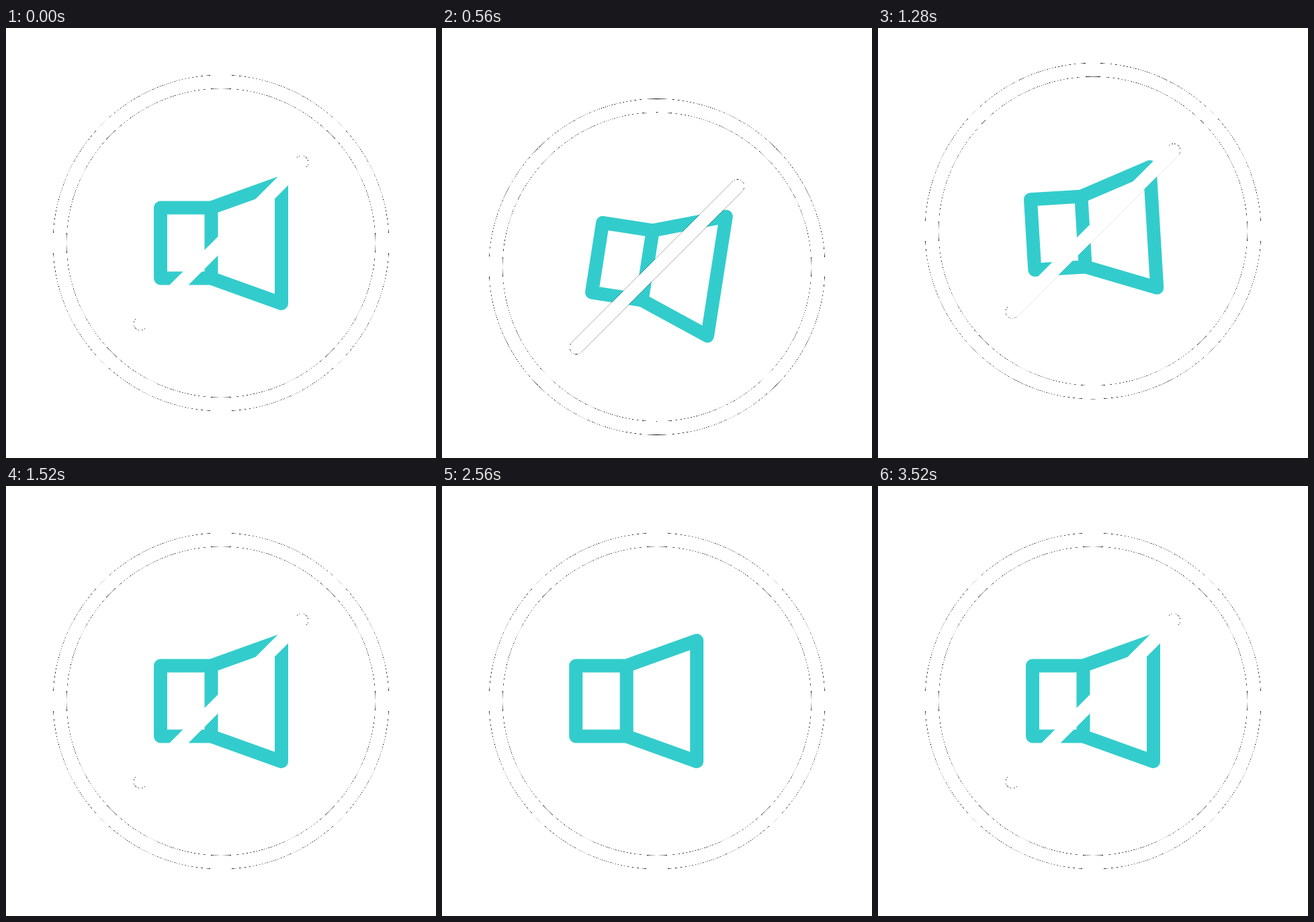
An HTML page with a canvas that plays this animation: 640x640 px, repeating every 3760 ms.

```html
<!DOCTYPE html>
<html lang="en">
<head>
<meta charset="utf-8">
<title>Mute toggle</title>
<style>
  html, body { margin: 0; width: 100%; height: 100%; overflow: hidden; background: #fff; }
  canvas { display: block; width: 640px; height: 640px; }
</style>
</head>
<body>
<canvas id="stage" width="640" height="640"></canvas>
<script>
const SIZE = 640, LOOP = 3760, STEP = 80, LAST = 3520;
const FRINGE_MAX = 130;

const ctx = document.getElementById('stage').getContext('2d');
const layer = document.createElement('canvas');
layer.width = layer.height = SIZE;
const ink = layer.getContext('2d', { willReadFrequently: true });

for (const c of [ctx, ink]) {
  c.lineWidth = 20;
  c.lineCap = c.lineJoin = 'round';
}
ctx.strokeStyle = '#3cc';
ink.strokeStyle = '#fff';

const ease = p => p * p * (3 - 2 * p);
const ramp = (t, from, to) => ease(Math.min(1, Math.max(0, (t - from) / (to - from))));

// Eased value through [time, value] keys.
function track(t, keys) {
  let value = keys[0][1];
  for (let i = 1; i < keys.length; i++) {
    const [t0, v0] = keys[i - 1], [t1, v1] = keys[i];
    value += (v1 - v0) * ramp(t, t0, t1);
  }
  return value;
}

// Part of a line between the fractions a and b.
function trimmed(x0, y0, x1, y1, a, b) {
  if (a >= b) return;
  const dx = x1 - x0, dy = y1 - y0;
  ink.beginPath();
  ink.moveTo(x0 + dx * a, y0 + dy * a);
  ink.lineTo(x0 + dx * b, y0 + dy * b);
  ink.stroke();
}

const speaker = new Path2D(
  'M230 267.5H305.5L410 230V410L305.5 372.5H230ZM305.5 267.5V372.5');

// Edge pixels less than half covered turn dark, the others stay white.
function darkenFringe() {
  const image = ink.getImageData(0, 0, SIZE, SIZE), px = image.data;
  for (let i = 0; i < px.length; i += 4) {
    const alpha = px[i + 3];
    if (alpha && alpha < FRINGE_MAX) {
      px[i] = px[i + 1] = px[i + 2] = 0;
      px[i + 3] = 2 * alpha;
    }
  }
  ink.putImageData(image, 0, 0);
}

function draw(t) {
  const y = track(t, [[0, 0], [480, 39.7], [1040, -35.7], [1520, 0]]);
  const tilt = track(t, [[0, 0], [480, 9.8], [1040, -6.9], [1520, 0]]);
  const x = track(t, [[1520, 0], [2000, -47.5], [2240, -47.5], [3040, 0]]);

  ctx.fillStyle = '#fff';
  ctx.fillRect(0, 0, SIZE, SIZE);
  ctx.save();
  ctx.translate(320 + x, 320 + y);
  ctx.rotate(tilt * Math.PI / 180);
  ctx.translate(-320, -320);
  ctx.stroke(speaker);
  ctx.restore();

  ink.clearRect(0, 0, SIZE, SIZE);
  ink.save();
  ink.translate(0, y);
  ink.beginPath();
  ink.arc(320, 320, 240, 0, 2 * Math.PI);
  ink.stroke();

  const redraw = t > 2600;
  trimmed(200, 440, 440, 200,
    redraw ? 0 : ramp(t, 1760, 2400),
    redraw ? ramp(t, 2740, 3480) : 1);

  const tail = ramp(t, 2240, 2560), head = ramp(t, 1760, 2240);
  trimmed(408, 320, 446, 320, tail, head);
  trimmed(411, 292, 437, 270, tail, head);
  trimmed(411, 348, 437, 370, tail, head);
  ink.restore();

  darkenFringe();
  ctx.drawImage(layer, 0, 0);
}

const start = performance.now();
let shown = -1;
function tick() {
  const elapsed = (performance.now() - start) % LOOP;
  const t = Math.min(LAST, Math.floor(elapsed / STEP) * STEP);
  if (t !== shown) draw(shown = t);
  requestAnimationFrame(tick);
}
tick();
</script>
</body>
</html>
```
